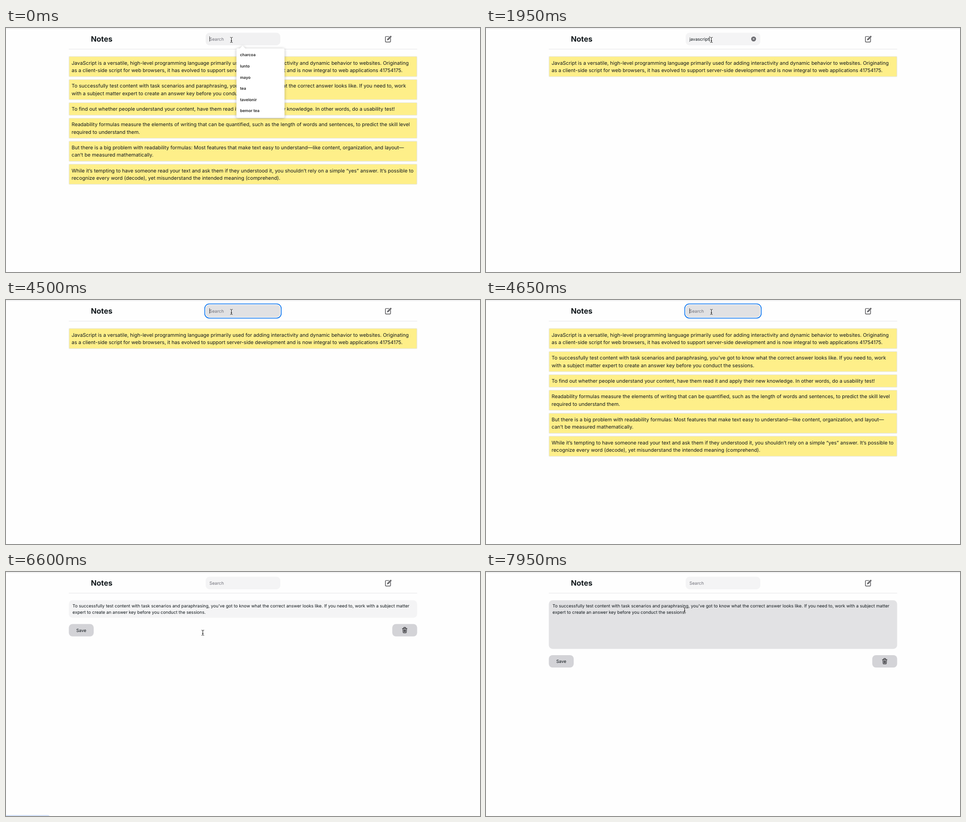
Recreate the animation shown at these times as an HTML page. Size 1044 px wide and 537 px high, loop 8 s.

```html
<!DOCTYPE html>
<html lang="en">
<head>
<meta charset="utf-8">
<title>Notes</title>
<style>
  html, body { margin: 0; width: 100%; height: 100%; overflow: hidden; background: #fefefe; }
  svg { display: block; width: 100vw; height: 100vh; }
  text {
    font: 16px Inter, "Liberation Sans", sans-serif;
    font-optical-sizing: none;
    text-rendering: geometricPrecision;
    fill: #11181c;
  }
  .small { font-size: 14px; }
  .title { font-size: 24px; font-weight: 700; }
  .item { font-size: 12.8px; font-weight: 600; fill: #222; }
  .hint { fill: #71717a; }
  .icon { fill: none; stroke: #2a2a2e; stroke-linecap: round; stroke-linejoin: round; }
  #menu { filter: drop-shadow(0 1px 3px rgba(0, 0, 0, .28)); }
</style>
</head>
<body>
<svg viewBox="0 0 1044 537" preserveAspectRatio="none">
  <rect width="1044" height="537" fill="#fefefe"/>
  <rect y="1" width="1044" height="1" fill="#e3e3e5"/>
  <rect x="138.4" y="46" width="767.2" height=".8" fill="#dedee2"/>

  <!-- page units, shown at the browser zoom -->
  <g transform="scale(.685)">
    <text class="title" x="273" y="44">Notes</text>
    <rect id="ring" x="639" y="12.3" width="246" height="46" rx="15" fill="none" stroke="#006fee" stroke-width="2.3"/>
    <rect id="pill" x="642" y="15.3" width="240" height="40" rx="12"/>
    <rect id="mark" x="654" y="26" width="64.5" height="18" fill="#b3d7ff"/>
    <text id="query" class="small" x="654" y="40.2"></text>
    <rect id="caret" y="26.5" width="1.2" height="17" fill="#222"/>
    <g id="clear">
      <circle cx="860.5" cy="35.2" r="7.8" fill="#67676c"/>
      <path d="M858 32.7l5 5m0-5l-5 5" stroke="#f4f4f5" stroke-width="1.5" stroke-linecap="round"/>
    </g>
    <g id="notes"></g>
    <g id="editor">
      <rect id="area" x="202" y="91" width="1120" rx="12"/>
      <text class="small" x="214" y="114.1">To successfully test content with task scenarios and paraphrasing, you’ve got to know what the correct answer looks like. If you need to, work with a subject matter</text>
      <text class="small" x="214" y="134.1">expert to create an answer key before you conduct the sessions.</text>
      <g id="buttons">
        <rect x="202" width="80" height="40" rx="12" fill="#d3d3d7"/>
        <text class="small" x="242" y="25.1" text-anchor="middle">Save</text>
        <rect x="1242" width="80" height="40" rx="12" fill="#d3d3d7"/>
        <path class="icon" stroke-width="1.7" d="M1274.5 14.5h15M1279 14v-2.2q0-.8.8-.8h4.4q.8 0 .8.8V14M1276 14.8l.8 12q.1 1.7 1.8 1.7h6.8q1.7 0 1.8-1.7l.8-12M1279.5 17.8l.3 7.6M1282 17.8v7.6M1284.5 17.8l-.3 7.6"/>
      </g>
    </g>
  </g>

  <path class="icon" stroke-width="1.15" d="M843.3 18.7H837.2q-1.6 0-1.6 1.6V29.2q0 1.6 1.6 1.6H845.4q1.6 0 1.6-1.6V22.8M840.2 26.4l.6-2.2 6-6.1q.7-.6 1.3 0 .6.7 0 1.4l-6 6z"/>

  <g id="menu">
    <path d="M514 46l7-7 7 7z" fill="#fff"/>
    <rect id="sheet" x="507.5" y="45" width="106" rx="3" fill="#fff"/>
    <g id="items" transform="scale(.685)"></g>
  </g>
  <rect id="bubble" x="-5" y="535.4" width="101" height="10" rx="3.5" fill="#d3e3fd" stroke="#b9cdec" stroke-width=".6"/>
  <g id="beam" fill="none" stroke-linecap="round">
    <path d="M-2.4-5.7Q-.2-5.7 0-4.6 .2-5.7 2.4-5.7M0-4.6V4.6M-2.4 5.7Q-.2 5.7 0 4.6 .2 5.7 2.4 5.7M-1.2 1.9H1.2" stroke="#fff" stroke-opacity=".6" stroke-width="2"/>
    <path d="M-2.4-5.7Q-.2-5.7 0-4.6 .2-5.7 2.4-5.7M0-4.6V4.6M-2.4 5.7Q-.2 5.7 0 4.6 .2 5.7 2.4 5.7M-1.2 1.9H1.2" stroke="#111" stroke-width="1"/>
  </g>
  <path id="arrow" d="M0 0V10.3L2.4 8.1 4 11.7 5.6 11 4.1 7.5H7.3z" fill="#000" stroke="#fff" stroke-width=".7"/>
</svg>
<script>
(() => {
  const LOOP = 8000, STEP = 150;
  const NOTES = [
    ["JavaScript is a versatile, high-level programming language primarily used for adding interactivity and dynamic behavior to websites. Originating",
     "as a client-side script for web browsers, it has evolved to support server-side development and is now integral to web applications 41754175."],
    ["To successfully test content with task scenarios and paraphrasing, you’ve got to know what the correct answer looks like. If you need to, work",
     "with a subject matter expert to create an answer key before you conduct the sessions."],
    ["To find out whether people understand your content, have them read it and apply their new knowledge. In other words, do a usability test!"],
    ["Readability formulas measure the elements of writing that can be quantified, such as the length of words and sentences, to predict the skill level",
     "required to understand them."],
    ["But there is a big problem with readability formulas: Most features that make text easy to understand—like content, organization, and layout—",
     "can’t be measured mathematically."],
    ["While it’s tempting to have someone read your text and ask them if they understood it, you shouldn’t rely on a simple “yes” answer. It’s possible to",
     "recognize every word (decode), yet misunderstand the intended meaning (comprehend)."]
  ];
  const RECENT = ["charcoa", "lunto", "mayo", "tea", "tavelonir", "bemor tea"];
  const WORD = "javascript";
  // [time, letters typed]
  const TYPING = [[0, 0], [450, 1], [600, 3], [750, 5], [1050, 6], [1350, 7], [1500, 9], [1650, 10], [4500, 0]];
  // times at which the caret turns off or on
  const BLINKS = [2100, 2700, 3150, 3600, 4050, 4500, 5100, 5550, 6000];
  // [time, x, y]
  const PATH = [[5400, 496.5, 26.2], [6450, 433.5, 132.5], [6600, 433.5, 133.7], [7500, 442.5, 82.6], [7950, 437.5, 84]];

  const $ = id => document.getElementById(id);
  const make = (parent, tag, attrs, label = "") => {
    const el = document.createElementNS("http://www.w3.org/2000/svg", tag);
    for (const key in attrs) el.setAttribute(key, attrs[key]);
    el.textContent = label;
    return parent.appendChild(el);
  };
  const set = (id, name, value) => $(id).setAttribute(name, value);
  const toggle = (el, on) => el.setAttribute("display", on ? "inline" : "none");
  const show = (id, on) => toggle($(id), on);
  const within = (t, from, to) => t >= from && t < to;

  let cardY = 91;
  const cards = NOTES.map(lines => {
    const card = make($("notes"), "g", {});
    const height = 18 + 24 * lines.length;
    make(card, "rect", { x: 202.7, y: cardY + .7, width: 1118.6, height: height - 1.4, rx: 1.5,
      fill: "#feef89", stroke: "#e4e5e3", "stroke-width": 1.6 });
    lines.forEach((line, i) => make(card, "text", { x: 211, y: cardY + 26.8 + 24 * i }, line));
    cardY += height + 8;
    return card;
  });
  const items = RECENT.map((name, i) =>
    make($("items"), "text", { class: "item", x: 752.5, y: 90.8 + 36 * i }, name));

  function pointer(t) {
    if (t <= PATH[0][0]) return PATH[0].slice(1);
    const i = PATH.findIndex(p => p[0] >= t);
    const [t0, x0, y0] = PATH[i - 1], [t1, x1, y1] = PATH[i];
    const k = (t - t0) / (t1 - t0), e = k * k * (3 - 2 * k);
    return [x0 + (x1 - x0) * e, y0 + (y1 - y0) * e];
  }

  function drawSearch(t, y) {
    const typed = TYPING.filter(p => p[0] <= t).pop()[1];
    const hot = within(t, 4050, 6450) && y < 39;
    set("pill", "fill", hot ? "#e1e1e3" : t < 450 ? "#f1f1f2" : "#f4f4f5");
    show("ring", within(t, 4500, 6450));
    show("mark", within(t, 4050, 4500));
    show("clear", typed > 0);

    const query = $("query");
    query.textContent = typed ? WORD.slice(0, typed) : "Search";
    query.classList.toggle("hint", !typed);
    set("caret", "x", 654 + (typed ? query.getComputedTextLength() : 0));
    show("caret", BLINKS.filter(b => b <= t).length % 2 === 0);

    const opening = t < 450;
    show("menu", t < 1650);
    set("sheet", "height", opening ? 152.7 : 29.5);
    items.forEach((el, i) => toggle(el, opening || i === 0));
    items[0].textContent = opening ? RECENT[0] : WORD;
  }

  function drawPage(t, editing) {
    const filtered = within(t, 1950, 4650);
    show("notes", !editing);
    cards.forEach((card, i) => toggle(card, !filtered || i === 0));

    const height = t >= 6750 ? 156 : 56;
    show("editor", editing);
    set("area", "height", height);
    set("area", "fill", t >= 6900 ? "#e2e2e4" : "#f4f4f5");
    set("buttons", "transform", `translate(0 ${111 + height})`);
  }

  function draw(time) {
    const t = Math.floor(time / STEP) * STEP;
    const [x, y] = pointer(t);
    const editing = t >= 6600;
    const overText = editing || y < 39;
    drawSearch(t, y);
    drawPage(t, editing);
    show("beam", overText);
    show("arrow", !overText);
    for (const id of ["beam", "arrow"]) set(id, "transform", `translate(${x} ${y})`);
    show("bubble", y > 62 && t < 6750);
  }

  const start = performance.now();
  function tick() {
    draw((performance.now() - start) % LOOP);
    requestAnimationFrame(tick);
  }
  tick();
})();
</script>
</body>
</html>
```
